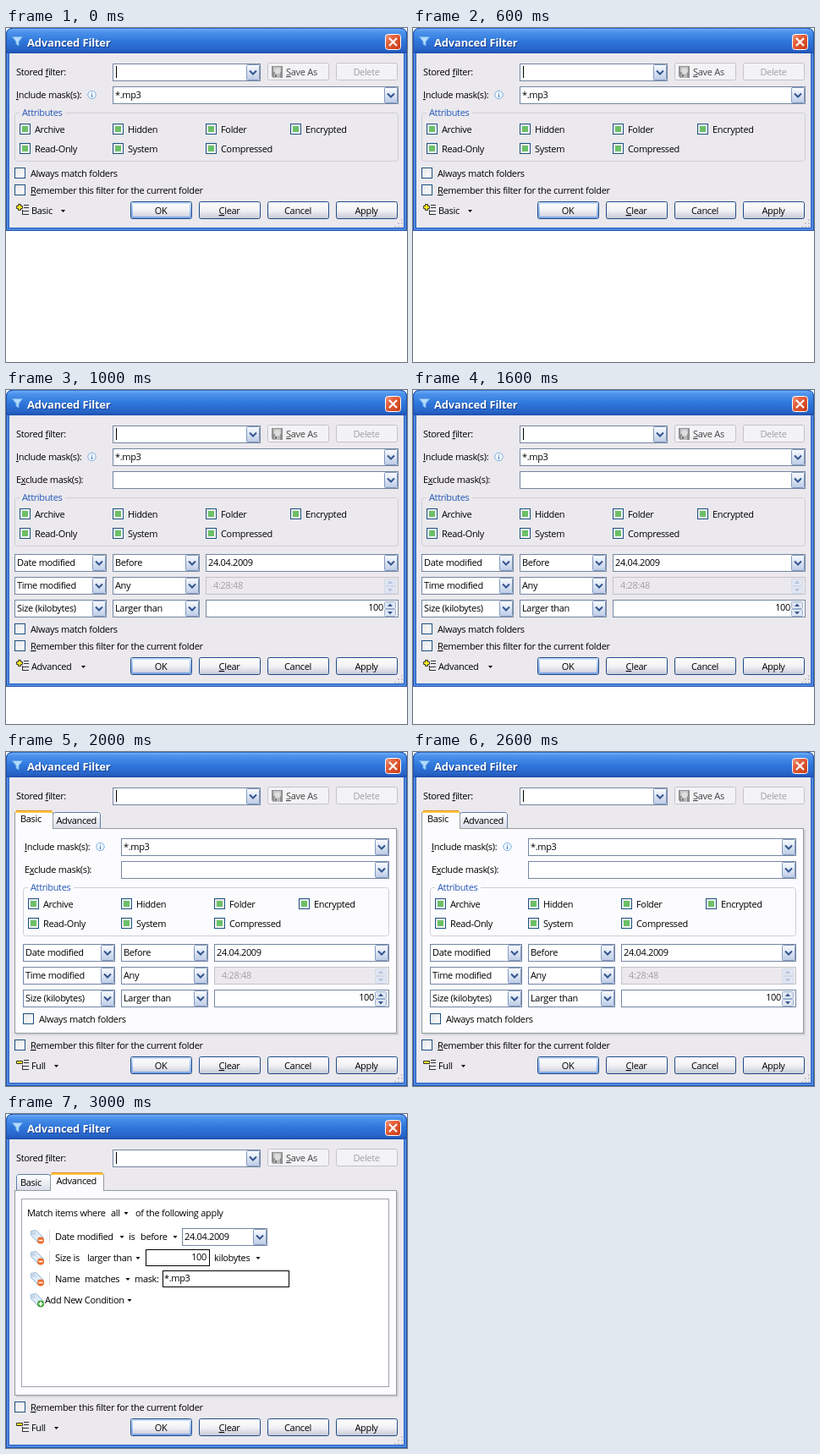
An HTML page for the animation above (4000 ms loop, 474x395 px).

```html
<!DOCTYPE html>
<html lang="en">
<head>
<meta charset="utf-8">
<title>Advanced Filter</title>
<style>
html, body { margin: 0; width: 100%; height: 100%; overflow: hidden; background: #fff; }
svg { display: block; width: 474px; height: 395px; }
text { font: 11px "Open Sans", "Noto Sans", sans-serif; letter-spacing: -.34px; word-spacing: .3px; white-space: pre; }
.title { font: 700 13px "Open Sans", "Noto Sans", sans-serif; letter-spacing: -.2px; }
.key { text-decoration: underline; }
</style>
</head>
<body>
<svg viewBox="0 0 474 395" xmlns="http://www.w3.org/2000/svg">
  <defs>
    <linearGradient id="bar" x2="0" y2="1">
      <stop offset="0" stop-color="#1a4fb5"/><stop offset=".05" stop-color="#6aa9f4"/>
      <stop offset=".15" stop-color="#4d93ec"/><stop offset=".5" stop-color="#3078dc"/>
      <stop offset=".85" stop-color="#2764c8"/><stop offset="1" stop-color="#1f50b0"/>
    </linearGradient>
    <linearGradient id="red" x2="1" y2="1">
      <stop offset="0" stop-color="#f0a088"/><stop offset=".35" stop-color="#e5603c"/>
      <stop offset="1" stop-color="#c63a12"/>
    </linearGradient>
    <linearGradient id="face" x2="0" y2="1">
      <stop offset="0" stop-color="#fff"/><stop offset=".5" stop-color="#f2f2f6"/>
      <stop offset="1" stop-color="#c6c9d6"/>
    </linearGradient>
    <linearGradient id="ring" x2="0" y2="1">
      <stop offset="0" stop-color="#c4dcfa"/><stop offset="1" stop-color="#7ea6e4"/>
    </linearGradient>
    <linearGradient id="drop" x2="0" y2="1">
      <stop offset="0" stop-color="#fafcff"/><stop offset="1" stop-color="#bccbe6"/>
    </linearGradient>
    <linearGradient id="check" x2="1" y2="1">
      <stop offset="0" stop-color="#e4e4e6"/><stop offset="1" stop-color="#fff"/>
    </linearGradient>
    <linearGradient id="tab" x2="0" y2="1">
      <stop offset="0" stop-color="#fff"/><stop offset="1" stop-color="#d8dce8"/>
    </linearGradient>
  </defs>
  <g id="view"></g>
</svg>
<script>
const view = document.getElementById("view");
const FACE = "#ebe9ed", PAGE = "#fcfcfe", EDGE = "#7486a2", FADED = "#c4c3ca", GREY = "#a2a1a6";
const INK = "#34568f", NAVY = "#1f4a86", TABLINE = "#919b9c";

const rect = (x, y, w, h, fill) =>
  `<rect x="${x}" y="${y}" width="${w}" height="${h}" fill="${fill}"/>`;
const box = (x, y, w, h, fill, stroke, r = 0) =>
  `<rect x="${x + .5}" y="${y + .5}" width="${w - 1}" height="${h - 1}" rx="${r}" fill="${fill}" stroke="${stroke}"/>`;
const line = (d, stroke, width = 1) =>
  `<path d="${d}" fill="none" stroke="${stroke}" stroke-width="${width}"/>`;
const shape = (d, fill, stroke = "none") => `<path d="${d}" fill="${fill}" stroke="${stroke}"/>`;

// "&" marks the underlined access key
const text = (x, y, s, fill = "#000", anchor = "start") =>
  `<text x="${x}" y="${y}" fill="${fill}" text-anchor="${anchor}">${
    s.replace(/&(.)/, '<tspan class="key">$1</tspan>')}</text>`;

const chevron = (x, y) => line(`M${x - 4} ${y - 2}l4 4 4-4`, INK, 2);
const caret = (x, y) => shape(`M${x - 2.5} ${y - 1}h5l-2.5 3z`, "#000");

function dropButton(x, y, h) {
  return box(x, y, 16, h, "url(#drop)", "#8299bd", 1) + chevron(x + 8, y + h / 2);
}

function combo(x, y, w, value = "") {
  return box(x, y, w, 21, "#fff", EDGE) + dropButton(x + w - 17, y + 1, 19) +
    text(x + 3, y + 14, value);
}

function button(x, y, label, on = true, isDefault = false) {
  const frame = box(x, y, 73, 21, on ? "url(#face)" : "#f3f2f5", on ? NAVY : FADED, 2);
  const ring = isDefault
    ? `<rect x="${x + 2}" y="${y + 2}" width="69" height="17" rx="1" fill="none" stroke="url(#ring)" stroke-width="2"/>` : "";
  return frame + ring + text(x + 36, y + 15, label, on ? "#000" : GREY, "middle");
}

function checkbox(x, y, label, gap, mixed) {
  return box(x, y, 13, 13, "url(#check)", "#1c5180") +
    (mixed ? rect(x + 3, y + 3, 7, 7, "#6cc067") : "") + text(x + gap, y + 11, label);
}

function spinner(x, y, color, edge) {
  const half = (top, d) => box(x, top, 14, 9, "#dfe6f3", edge, 1) + shape(d, color);
  return half(y + 2, `M${x + 4} ${y + 8}h6l-3-3.5z`) + half(y + 11, `M${x + 4} ${y + 14}h6l-3 3.5z`);
}

function windowFrame(h) {
  const outline = (i, bottom) =>
    `M${i} ${bottom}V8Q${i} ${i} 8 ${i}H466Q${474 - i} ${i} ${474 - i} 8V${bottom}z`;
  const layers = ["#1f50b0", "#5a93e6", "#4580da", "#3068c8"];
  let s = layers.map((c, i) => shape(outline(i, h - i), c)).join("");
  s += shape(outline(0, 30), "url(#bar)") + rect(4, 30, 466, h - 34, FACE);
  s += line("M.5 30V8Q.5 .5 8 .5M473.5 30V8Q473.5 .5 466 .5", "#1f50b0");
  s += shape("M7.5 10.5h12l-4.5 5.5v5l-3-2v-3z", "#b4dcfb", "#6fb0ee");
  s += `<text class="title" x="26" y="23" fill="#173f8c">Advanced Filter</text>`;
  s += `<text class="title" x="25" y="22" fill="#fff">Advanced Filter</text>`;
  s += box(448, 7, 19, 19, "url(#red)", "#fff", 3);
  s += line("M453 12l9 9M462 12l-9 9", "#fff", 2.2);
  for (let row = 0; row < 3; row++)
    for (let col = 0; col <= row; col++)
      s += rect(467 - col * 4, h - 14 + row * 4, 2, 2, "#c8c6cc");
  return s;
}

function storedRow() {
  return text(12, 56, "Stored &filter:") + combo(126, 42, 175) +
    rect(130, 45, 1, 14, "#000") +
    box(309, 41, 73, 21, "#f3f2f5", FADED, 2) +
    shape("M314 45h13v14h-11l-2-2z", "#909090") + rect(316, 46, 9, 6, "#c8c8c8") +
    rect(317, 54, 7, 5, "#bbb") + rect(318, 55, 2, 3, "#777") +
    `<circle cx="321" cy="51" r="3.5" fill="#dedede"/>` +
    text(331, 56, "&Save As", "#444") + button(390, 41, "Delete", false);
}

function modeIcon(y, mode) {
  const sign = mode === "Full"
    ? `M12.5 ${y + 3.5}h7v3h-7z`
    : `M14.5 ${y + 1.5}h3v2h2v3h-2v2h-3v-2h-2v-3h2z`;
  return line(`M21 ${y + 2.5}h6M21 ${y + 5.5}h6M20 ${y + 9.5}h7M20 ${y + 13.5}h7M19.5 ${y + 8}v6`, "#333") +
    shape(sign, "#ffea20", "#333");
}

function footer(y, mode, caretX) {
  return checkbox(10, y - 20, "&Remember this filter for the current folder", 19) +
    modeIcon(y + 2, mode) + text(30, y + 15, mode) + caret(caretX, y + 11) +
    button(147, y, "OK", true, true) + button(228, y, "&Clear") +
    button(309, y, "Cancel") + button(390, y, "Apply");
}

function includeRow(x, y, right) {
  const cx = x + 91.5, cy = y + 10;
  return text(x + 2, y + 14, "&Include mask(s):") +
    `<circle cx="${cx}" cy="${cy}" r="4.7" fill="#f4f9ff" stroke="#79aee0"/>` +
    rect(cx - .5, cy - 2.5, 1, 1, "#2a6fc0") + rect(cx - .5, cy - .5, 1, 3.5, "#2a6fc0") +
    combo(x + 116, y, right - x - 116, "*.mp3");
}

function excludeRow(x, y, right) {
  return text(x + 2, y + 14, "E&xclude mask(s):") + combo(x + 116, y, right - x - 116);
}

function attributes(x, y, right, bg) {
  const names = ["Archive", "Hidden", "Folder", "Encrypted", "Read-Only", "System", "Compressed"];
  const cols = [6, 116, 226, 326];
  return box(x, y, right - x, 58, "none", "#cfced6", 3) + rect(x + 6, y - 2, 54, 5, bg) +
    text(x + 9, y + 4, "Attributes", "#2458b8") +
    names.map((n, i) => checkbox(x + cols[i % 4], y + 13 + 23 * (i >> 2), n, 18, true)).join("");
}

function conditions(x, y, right) {
  const fx = x + 226, w = right - fx;
  const rows = [["Date modified", "Before"], ["Time modified", "Any"], ["Size (kilobytes)", "Larger than"]];
  return rows.map(([what, how], i) =>
      combo(x, y + 27 * i, 109, what) + combo(x + 116, y + 27 * i, 103, how)).join("") +
    combo(fx, y, w, "24.04.2009") +
    box(fx, y + 27, w, 21, FACE, FADED) + text(fx + 9, y + 41, "4:28:48", GREY) +
    spinner(right - 17, y + 27, "#b4c2da", "#d3d9e6") +
    box(fx, y + 54, w, 21, "#fff", EDGE) + text(right - 18, y + 67, "100", "#000", "end") +
    spinner(right - 17, y + 54, INK, "#9db0cf");
}

function tabs(active) {
  const spans = active ? [[12, 53], [52, 116]] : [[10, 56], [55, 112]];
  const tab = (i) => {
    const [a, b] = spans[i], on = i === active, top = on ? 69 : 71;
    const d = `M${a + .5} 91V${top + 2.5}l2-2H${b - 2.5}l2 2V91`;
    return shape(d, on ? PAGE : "url(#tab)", on ? TABLINE : "#5d7ca6") +
      (on ? rect(a + 2, 69, b - a - 4, 1, "#e68b2c") + rect(a + 1, 70, b - a - 2, 2, "#ffc73c")
            + rect(a + 1, 90, b - a - 2, 2, PAGE) : "") +
      text(i ? 59.5 : 17, on ? 83 : 85, ["Basic", "Advanced"][i]);
  };
  return tab(1 - active) + rect(12, 92, 452, 243, "#d3d1d7") +
    box(10, 90, 452, 243, PAGE, TABLINE) + tab(active);
}

function tag(y, add) {
  const body = `M29.5 ${y + 2.5}l6-1 9 9-6 6-9-9z`;
  const sign = add ? "#3fa535" : "#ee6a28";
  return shape(body, "#d9e8f7", "#9db9d4") +
    `<circle cx="32.5" cy="${y + 5}" r="1.3" fill="#fff" stroke="#8aa6c2" stroke-width=".7"/>` +
    line(`M34 ${y + 8}l5 5M37 ${y + 6}l5 5`, "#f6fbff") +
    `<circle cx="41" cy="${y + 13.5}" r="4" fill="${sign}"/>` +
    rect(38.5, y + 12.7, 5, 1.6, "#fff") + (add ? rect(40.2, y + 11, 1.6, 5, "#fff") : "");
}

function rules() {
  const words = (y, list) => list.map(([x, s]) => text(x, y, s)).join("");
  const carets = (y, list) => list.map((x) => caret(x, y)).join("");
  return box(18, 100, 435, 223, "#fff", "#a0a4ac") +
    words(121, [[25, "Match items where"], [124, "all"], [153, "of the following apply"]]) +
    carets(117, [142]) +
    [136, 161, 186].map((y) => tag(y) + rect(51, y + 1, 1, 16, "#d8d8d8")).join("") +
    words(149, [[58, "Date modified"], [145, "is"], [159, "before"]]) + carets(145, [137, 200]) +
    box(208, 135, 101, 21, "#fff", EDGE) + text(211, 149, "24.04.2009") + dropButton(292, 136, 19) +
    words(174, [[58, "Size is"], [96, "larger than"], [246, "kilobytes"]]) + carets(170, [156, 298]) +
    box(165, 160, 76, 20, "#fff", "#000") + text(237, 173, "100", "#000", "end") +
    words(199, [[58, "Name"], [93, "matches"], [152, "mask:"]]) + carets(195, [144]) +
    box(185, 185, 150, 20, "#fff", "#000") + text(187, 198, "*.mp3") +
    tag(211, true) + text(46, 224, "Add New Condition") + carets(220, [146]);
}

const scenes = [
  () => windowFrame(240) + storedRow() + includeRow(10, 69, 464) + attributes(10, 100, 464, FACE) +
    checkbox(10, 165, "Always match folders", 19) + footer(205, "Basic", 67.5),
  () => windowFrame(351) + storedRow() + includeRow(10, 69, 464) + excludeRow(10, 96, 464) +
    attributes(10, 127, 464, FACE) + conditions(10, 194, 464) +
    checkbox(10, 276, "Always match folders", 19) + footer(316, "Advanced", 91.5),
  () => windowFrame(395) + storedRow() + tabs(0) + includeRow(20, 102, 453) + excludeRow(20, 129, 453) +
    attributes(20, 160, 453, PAGE) + conditions(20, 227, 453) +
    checkbox(20, 309, "Always match folders", 19) + footer(360, "Full", 59.5),
  () => windowFrame(395) + storedRow() + tabs(1) + rules() + footer(360, "Full", 59.5)
];

let shown = -1;
function update(ms) {
  const index = Math.floor(ms / 1000) % scenes.length;
  if (index !== shown) view.innerHTML = scenes[shown = index]();
}

const start = performance.now();
function tick() {
  update(performance.now() - start);
  requestAnimationFrame(tick);
}
tick();
</script>
</body>
</html>
```
